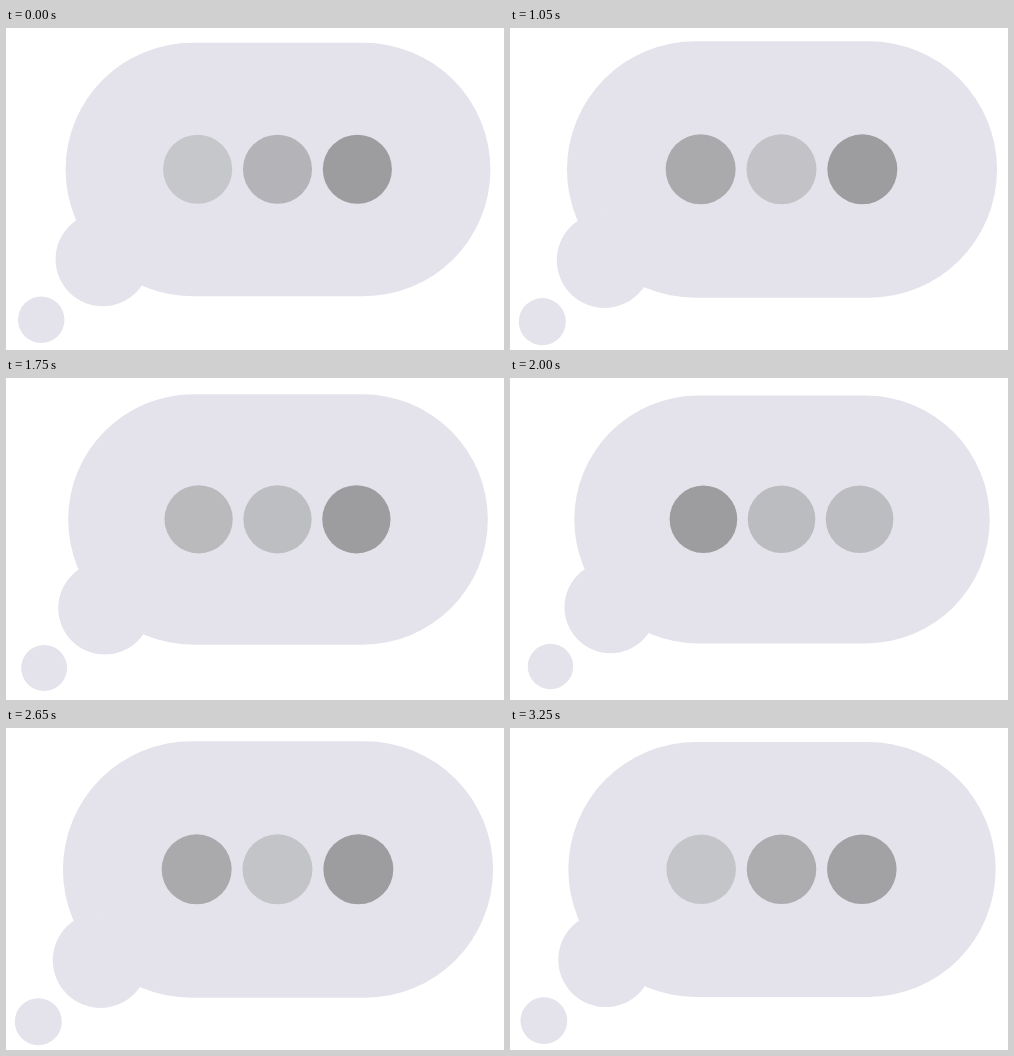
Animation, 498 px wide and 322 px high, one loop 3300 ms. Source, as an HTML page:

```html
<!DOCTYPE html>
<html lang="en">
<head>
<meta charset="utf-8">
<title>Typing bubble</title>
<style>
  html, body { margin: 0; width: 100%; height: 100%; overflow: hidden; background: #fff; }
  svg { display: block; width: 100vw; height: 100vh; }
  #bubble { filter: blur(.6px); }
</style>
</head>
<body>
<svg viewBox="0 0 498 322">
  <g id="bubble" fill="#e4e3ec">
    <rect x="60" y="15" width="424" height="253" rx="126.5"/>
    <circle cx="97" cy="231" r="47"/>
    <circle cx="35.7" cy="291.5" r="23.2"/>
    <circle class="dot" cx="191.8" cy="141.3" r="34.5"/>
    <circle class="dot" cx="271.5" cy="141.3" r="34.5"/>
    <circle class="dot" cx="351.2" cy="141.3" r="34.5"/>
  </g>
</svg>
<script>
const LOOP = 3300, STEP = 50, BEATS = 12;
const CENTER = { x: 272, y: 141.5 };
const DARK = [157, 156, 158], LIGHT = [198, 199, 203];

const bubble = document.getElementById('bubble');
const dots = [...document.querySelectorAll('.dot')];
const mod = (a, n) => ((a % n) + n) % n;
const clamp = u => Math.min(1, Math.max(0, u));
const lerp = (a, b, u) => a + (b - a) * u;

// The dark dot advances once per beat; the tempo drifts slightly over the loop.
const beatAt = turn => BEATS * turn - .1 * Math.sin(2 * Math.PI * turn);

// Lightness of a dot by beats since it turned dark: hold, fade out quickly, darken again.
function lightness(age) {
  return age < 2 ? clamp((age - .75) / 1.25) ** .35 : clamp((2.85 - age) / .85) ** .6;
}

// Quick shrink, slower growth; one breath takes six beats.
function breath(beat) {
  const phase = mod(beat / 6 - .815, 1), fall = .36;
  const turn = phase < fall ? phase / fall : 1 + ((phase - fall) / (1 - fall)) ** 1.15;
  return 1.003 + .0235 * Math.cos(Math.PI * turn);
}

function draw(ms) {
  const tick = Math.floor(mod(ms, LOOP) / STEP) * STEP;
  const beat = beatAt(tick / LOOP);
  const { x, y } = CENTER;
  bubble.setAttribute('transform', `translate(${x} ${y}) scale(${breath(beat)}) translate(${-x} ${-y})`);
  dots.forEach((dot, i) => {
    const light = lightness(mod(beat - i - 1, 3));
    dot.setAttribute('fill', `rgb(${DARK.map((c, j) => Math.round(lerp(c, LIGHT[j], light)))})`);
  });
}

const start = performance.now();
function frame() {
  draw(performance.now() - start);
  requestAnimationFrame(frame);
}
frame();
</script>
</body>
</html>
```
